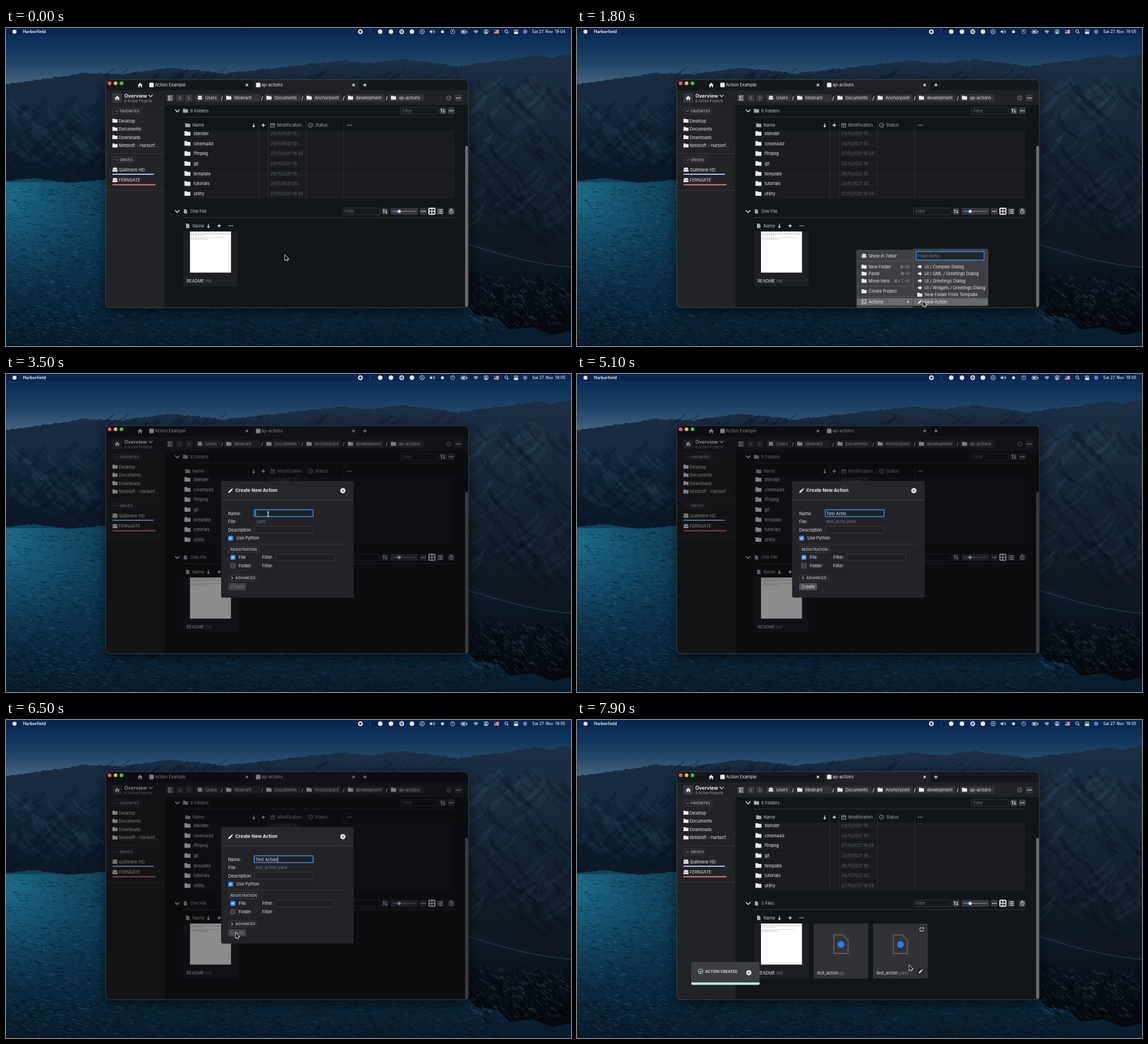
An HTML page with a canvas that plays this animation: 998 by 561 pixels, repeating every 8000 ms.

```html
<!DOCTYPE html>
<html lang="en">
<head>
<meta charset="utf-8">
<title>Create a new action</title>
<style>
html, body { margin: 0; width: 100%; height: 100%; overflow: hidden; background: #081b2b; }
canvas { display: block; }
</style>
</head>
<body>
<canvas width="998" height="561"></canvas>
<script>
const LOOP = 8000;
const WHITE = '#e9eaec', GREY = '#77797e', BLUE = '#3a93ea';
const screen = document.querySelector('canvas').getContext('2d');
let g = screen;

const paths = {
  folder: 'M-5-4h4l1.2 1.3h4.8v6.5h-10z',
  drive: 'M-3.2-3.8h6.4l1.2 3.5h-8.8zM-4.4.3h8.8v3.2h-8.8z',
  file: 'M-3.2-4.2h4l2.4 2.4v6h-6.4z',
  home: 'M-4.4.4L0-4 4.4.4H3.2V4H1V1.3H-1V4H-3.2V.4z',
  pencil: 'M-4 4l.6-2.4 5-5 1.8 1.8-5 5zM2.3-4l.8-.7 1.7 1.8-.7.7z',
  gem: 'M-4.5 0l3-2.6 1 1 1.3-2.2 3.7 3.8-3.7 3.8-1.3-2.2-1 1z',
  speaker: 'M-4-1.5h2l2.5-2.3v7.6l-2.5-2.3h-2z',
  arrow: 'M0 0v8.2l1.9-1.8 1.4 3.1 1.4-.6-1.4-3h2.6z',
  down: 'M-3.5-1.8L0 1.8 3.5-1.8',
  left: 'M1.8-3.2L-1.6 0 1.8 3.2',
  right: 'M-1.5-2.6L1.3 0-1.5 2.6',
  cross: 'M-2-2L2 2M2-2L-2 2',
  plus: 'M-3 0H3M0-3V3',
  sink: 'M0-3.2V3M-2 1L0 3.2 2 1',
  sort: 'M-2 3V-3M-3.8-1.3L-2-3.2-.2-1.3M2-3V3M.2 1.3L2 3.2 3.8 1.3',
  check: 'M-1.8 0L-.5 1.4 2-1.4',
  collapse: 'M-4.5-3.4H4M-1 0H4M-4.5 3.4H4M-1-2L-3.4 0-1 2',
  calendar: 'M-3.5-3H3.5V3.5H-3.5zM-3.5-1H3.5M-1 2L3-2',
  open: 'M-.5-3H-3.2V3.2H3V.5M0 0L3.4-3.4M.8-3.4H3.4V-.8',
  shell: 'M-3.8-3.8H3.8V3.8H-3.8zM-1.8-1.6L0 0-1.8 1.6M.4 1.8H2',
  beam: 'M-1.8-4Q0-4 0-2.5V2.5Q0 4-1.8 4M1.8-4Q0-4 0-2.5M0 2.5Q0 4 1.8 4'
};
for (const k in paths) paths[k] = new Path2D(paths[k]);

function icon(name, x, y, color = WHITE, lineWidth = 0, scale = 1) {
  g.save();
  g.translate(x, y);
  g.scale(scale, scale);
  g.fillStyle = g.strokeStyle = color;
  g.lineWidth = lineWidth;
  if (lineWidth) g.stroke(paths[name]); else g.fill(paths[name]);
  g.restore();
}
function box(x, y, w, h, fill, r = 0, stroke, lineWidth = 1) {
  g.beginPath();
  g.roundRect(x, y, w, h, r);
  if (fill) { g.fillStyle = fill; g.fill(); }
  if (stroke) { g.strokeStyle = stroke; g.lineWidth = lineWidth; g.stroke(); }
}
function disc(x, y, r, fill, stroke, lineWidth = 1) {
  g.beginPath();
  g.arc(x, y, r, 0, 7);
  if (fill) { g.fillStyle = fill; g.fill(); }
  if (stroke) { g.strokeStyle = stroke; g.lineWidth = lineWidth; g.stroke(); }
}
function text(s, x, y, color = WHITE, size = 7.4, weight = 430, align = 'left') {
  g.font = `${weight} ${size}px Inter, sans-serif`;
  g.textAlign = align;
  g.fillStyle = color;
  g.fillText(s, x, y + size * .36);
  return g.measureText(s).width;
}
function dots(x, y, color = WHITE) {
  for (const d of [-3, 0, 3]) disc(x + d, y, 1, color);
}
function button(x, y, w = 12) { box(x - w / 2, y - 6, w, 12, '#35373c', 2); }
function closer(x, y) { disc(x, y, 4.6, WHITE); icon('cross', x, y, '#222327', 1.2, .8); }
function linear(y0, y1, ...colors) {
  const f = g.createLinearGradient(0, y0, 0, y1);
  colors.forEach((c, i) => f.addColorStop(i / (colors.length - 1), c));
  return f;
}

function paintWallpaper() {
  let seed = 7;
  const rnd = () => (seed = (seed * 16807) % 2147483647) / 2147483647;
  // Jagged skyline through the given points, filled down to the bottom edge
  function ridge(pts, fill, rough) {
    g.beginPath();
    g.moveTo(pts[0], 561);
    for (let i = 0; i < pts.length - 2; i += 2) {
      const [x0, y0, x1, y1] = pts.slice(i, i + 4);
      for (let x = x0; x < x1; x += 4)
        g.lineTo(x, y0 + (y1 - y0) * (x - x0) / (x1 - x0) + (rnd() - .5) * rough);
    }
    g.lineTo(pts.at(-2), pts.at(-1));
    g.lineTo(pts.at(-2), 561);
    g.fillStyle = fill;
    g.fill();
  }
  function strokes(n, x, y, w, h, dx, dy, color, width = 1.5) {
    g.strokeStyle = color;
    for (let i = 0; i < n; i++) {
      const px = x + rnd() * w, py = y + rnd() * h, k = .3 + rnd();
      g.lineWidth = .4 + rnd() * width;
      g.beginPath();
      g.moveTo(px, py);
      g.quadraticCurveTo(px + dx * k * .3, py + dy * k * .7, px + dx * k, py + dy * k);
      g.stroke();
    }
  }
  box(0, 0, 998, 561, linear(0, 100, '#0a2a52', '#0f345c', '#24486a', '#456680'));
  ridge([0, 99, 50, 92, 100, 85, 140, 79, 205, 82, 285, 70, 390, 80, 480, 70, 590, 57, 640, 62,
    700, 55, 800, 67, 890, 56, 935, 48, 965, 53, 998, 45], linear(45, 300, '#1c2f44', '#11243a', '#0a1828'), 3);
  ridge([0, 128, 50, 112, 105, 118, 150, 106, 200, 135, 300, 155], linear(105, 280, '#182d45', '#0e2033', '#0a1725'), 4);
  ridge([780, 128, 830, 98, 880, 118, 940, 88, 998, 104], linear(90, 420, '#1b2e41', '#13212f', '#0c151f'), 4);
  strokes(45, -20, 118, 170, 100, 38, 34, 'rgba(70,105,140,.10)', 8);
  strokes(45, 20, 118, 170, 115, -36, 32, 'rgba(2,10,20,.20)', 9);
  strokes(60, 840, 85, 170, 250, -44, 38, 'rgba(85,115,145,.09)', 9);
  strokes(60, 815, 85, 170, 260, 38, 40, 'rgba(2,8,15,.20)', 10);
  strokes(70, 180, 70, 640, 22, -24, 16, 'rgba(4,12,24,.25)', 4);

  ridge([0, 270, 50, 265, 110, 273, 180, 267, 500, 300, 818, 430, 998, 515],
    linear(265, 561, '#12435b', '#0d3a55', '#0b2b43', '#071a29'), 2);
  const glow = g.createRadialGradient(5, 295, 10, 5, 295, 180);
  glow.addColorStop(0, 'rgba(34,128,162,.6)');
  glow.addColorStop(1, 'rgba(20,90,125,0)');
  box(0, 272, 240, 260, glow);
  strokes(700, 0, 276, 178, 280, 7, 1.5, 'rgba(85,155,190,.16)');
  strokes(700, 0, 276, 178, 280, 8, 1, 'rgba(0,14,28,.26)', 2.2);
  strokes(900, 0, 490, 880, 70, 8, 2, 'rgba(75,130,170,.14)');
  strokes(700, 0, 490, 880, 70, 9, 1, 'rgba(0,6,14,.28)', 2.2);

  g.fillStyle = linear(365, 540, '#101f2e', '#08101a', '#04080d');
  g.beginPath();
  [[810, 365], [860, 390], [998, 418], [998, 535], [965, 542], [930, 528], [890, 532], [868, 512], [830, 506], [810, 485]]
    .forEach(p => g.lineTo(...p));
  g.fill();
  strokes(220, 820, 435, 170, 85, 7, 6, 'rgba(105,130,150,.18)', 2.5);
  strokes(120, 820, 430, 170, 95, 8, 9, 'rgba(0,2,6,.35)', 5);
  g.strokeStyle = 'rgba(100,125,145,.45)';
  g.lineWidth = 1;
  g.beginPath();
  g.moveTo(815, 381);
  g.bezierCurveTo(865, 397, 930, 417, 998, 422);
  g.stroke();
}

function menuBar(t) {
  box(0, 0, 998, 12.5, 'rgba(8,36,82,.7)');
  disc(15, 6.5, 3.6, WHITE);
  text('Harborfield', 30, 6.5, WHITE, 7.2, 700);
  disc(626, 6.5, 3, WHITE, WHITE, 2.5);
  disc(626, 6.5, 2, '#10253d');
  for (const y of [3.5, 6.5, 9.5]) disc(643, y, .7, GREY);
  for (const x of [661, 680, 717]) disc(x, 6.5, 4, WHITE);
  disc(699, 6.5, 3.2, null, WHITE, 2);
  disc(699, 6.5, 1, WHITE);
  disc(735, 6.5, 3.8, null, WHITE);
  icon('right', 735.4, 6.5, WHITE, 0, .8);
  icon('speaker', 752, 6.5, WHITE, 0, .9);
  g.lineWidth = 1;
  g.strokeStyle = WHITE;
  for (const r of [2, 4]) { g.beginPath(); g.arc(753, 6.5, r, -.8, .8); g.stroke(); }
  disc(771, 6.5, 2.6, WHITE);
  disc(789, 6.5, 3.6, null, WHITE, .8);
  box(788.5, 4, 1, 3, WHITE);
  box(804, 4, 9, 5.5, null, 1.5, WHITE);
  box(805.5, 5.5, 5, 2.5, WHITE);
  box(814, 5.5, 1, 2.5, WHITE);
  for (const r of [1, 3.2, 5.4]) { g.beginPath(); g.arc(830, 10, r, -2.35, -.8); g.lineWidth = 1.3; g.strokeStyle = WHITE; g.stroke(); }
  disc(848, 6.5, 3.7, null, WHITE);
  disc(848, 5.7, 1.3, WHITE);
  box(846, 7.5, 4, 1.8, WHITE, 1);
  box(862, 3, 8.5, 7, '#e8dede');
  for (let i = 0; i < 4; i++) box(862, 3 + i * 2, 8.5, 1, '#c3444b');
  box(862, 3, 4, 4, '#3d5698');
  disc(883.5, 5.8, 2.5, null, WHITE);
  box(885.4, 7.7, 2, 2, WHITE, 1);
  box(897.5, 3.5, 7, 2.5, null, 1.2, WHITE);
  box(897, 7, 8, 3.5, WHITE, 1.7);
  disc(917, 6.5, 3.7, '#6d78b5');
  text(t < 400 ? 'Sat 27. Nov  19:04' : 'Sat 27. Nov  19:05', 988, 6.5, WHITE, 6.9, 500, 'right');
}

function sidebar() {
  box(176, 136, 104, 357.5, '#222327', [0, 0, 0, 8]);
  const heading = (s, y, w) => {
    box(188.5, y - 5, w, 10, null, 1, '#393b40');
    icon('down', 195.5, y, '#b9bbbf', 1, .75);
    text(s, 201, y, '#b9bbbf', 6.4, 500);
  };
  heading('FAVORITES', 146.5, 50);
  ['Desktop', 'Documents', 'Downloads', 'Nimbloft - Harborf...'].forEach((s, i) => {
    const y = 164 + i * 14.6;
    icon('folder', 192.5, y - .5, WHITE, 0, .9);
    text(s, 199, y);
  });
  box(176, 221, 104, 1, '#34363a');
  heading('DRIVES', 232.5, 39);
  [['Quillmere HD', 250, 73, '#a9c7f5'], ['FERNGATE', 268.5, 76, '#e8797b']].forEach(([s, y, w, c]) => {
    icon('drive', 192.5, y);
    text(s, 199, y);
    box(188, y + 7, w, 2, c);
  });
  box(176, 286, 104, 1, '#34363a');
}

function header() {
  box(176, 91, 641, 19, '#15181b', [8, 8, 0, 0]);
  box(436, 91, 188, 19, '#1f2125');
  box(176, 110, 641, 26, '#1f2125');
  icon('home', 237, 100.5);
  for (const [s, x, end] of [['Action Example', 253, 425.5], ['ap-actions', 441.5, 614]]) {
    box(x, 96.5, 8, 8, WHITE, 1.5);
    text(s, x + 10, 100.5);
    icon('cross', end, 100.5, WHITE, 1.3);
  }
  icon('plus', 634, 100.5, WHITE, 1.4);
  box(188, 115, 17, 17, '#35373c', 2);
  icon('home', 196.5, 123.5);
  text('Overview', 209, 120, WHITE, 8.6, 700);
  icon('down', 255.5, 119.5, WHITE, 1.2);
  text('8 Active Projects', 209, 129, '#a2a4a8', 6.2);
  button(290, 123.5, 13);
  icon('collapse', 290, 123.5, WHITE, 1.2);
  for (const [x, name] of [[307, 'left'], [323, 'right']]) {
    button(x, 123.5, 13);
    icon(name, x, 123.5, '#86888c', 1.1);
  }
  const crumbs = [['Users', 334, 45], ['tillobrant', 385, 65], ['Documents', 456, 65],
    ['Anchorpoint', 527, 66], ['development', 600, 69], ['ap-actions', 676, 62]];
  crumbs.forEach(([s, x, w], i) => {
    box(x, 117, w, 13, '#303237', 2);
    icon(i ? 'folder' : 'drive', x + 8.5, 123, WHITE, 0, .9);
    text(s, x + 18, 123.5);
    if (i) text('/', x - 3.5, 123.5, WHITE, 9, 600, 'center');
  });
  disc(782, 123.5, 3.8, null, '#9a9ca0', .9);
  icon('check', 782, 123.5, '#9a9ca0', .9);
  button(799, 123.5, 13);
  dots(799, 123.5);
}

function section(y, name, label, filterX) {
  icon('down', 302.5, y, WHITE, 1.4, 1.1);
  icon(name, 317, y, '#a6a8ac', 0, .9);
  text(label, 325.5, y, '#c2c4c7');
  box(313, y + 10.5, 479, 1, '#35373b');
  box(filterX + .5, y - 6, 66, 12, '#15181c', 1, '#33353a');
  text('Filter', filterX + 4, y, GREY);
  button(filterX + 75.5, y);
  icon('sort', filterX + 75.5, y, WHITE, 1);
}

function folderList() {
  section(146, 'folder', '8 Folders', 696);
  button(786.5, 146);
  dots(786.5, 146);
  icon('folder', 321, 171.5, '#a6a8ac', 0, .9);
  text('Name', 329.5, 171.5, '#c2c4c7');
  icon('sink', 437.5, 171.5, WHITE, 1.2);
  icon('plus', 454.5, 171.5, WHITE, 1.4);
  icon('calendar', 471, 171.5, '#a6a8ac', .9);
  text('Modification...', 479, 171.5, '#a6a8ac');
  disc(538, 171.5, 3.8, null, '#a6a8ac', .9);
  icon('check', 538, 171.5, '#a6a8ac', .9);
  text('Status', 546, 171.5, '#a6a8ac');
  dots(606.5, 171.5, '#a6a8ac');
  g.save();
  g.beginPath();
  g.rect(313, 181, 480, 121);
  g.clip();
  [['blender', '23/11/2021 15:...'], ['cinema4d', '24/11/2021 10:...'], ['ffmpeg', '27/11/2021 18:29'],
    ['git', '23/11/2021 19:...'], ['template', '26/11/2021 10:...'], ['tutorials', '24/11/2021 20:...'],
    ['utility', '27/11/2021 18:29']].forEach(([s, date], i) => {
    const y = 186.3 + i * 17.67;
    box(313, y - 8.3, 479, 16.6, '#1a1c20');
    icon('folder', 320.5, y - .2, WHITE, 0, 1.05);
    text(s, 331.5, y);
    text(date, 467, y, '#64666b');
  });
  g.restore();
  for (const x of [446, 463, 530, 596]) box(x, 164, 1, 136, '#2b2d31');
}

function fileSection(created) {
  section(323.5, 'file', created ? '3 Files' : 'One File', 594);
  box(679, 317.5, 49, 12, '#35373c', 2);
  box(683, 323, 41, 1, '#8a8c90');
  box(683, 322.7, 12, 1.5, BLUE);
  disc(694.5, 323.5, 2.8, WHITE);
  for (const x of [737, 767, 786.5]) button(x, 323.5);
  dots(737, 323.5);
  box(746, 317, 12.5, 12.5, WHITE, 2);
  for (const [x, y] of [[748, 319], [753, 319], [748, 324], [753, 324]]) box(x, y, 3.6, 3.6, '#222327');
  for (const y of [320, 323, 326]) { box(763, y, 1.3, 1.3, WHITE); box(765.3, y, 6, 1.3, WHITE); }
  disc(786.5, 324, 3.3, null, WHITE);
  box(786, 322, 1, 2.5, WHITE);
  box(785, 318.8, 3, 1.2, WHITE);
  icon('file', 321, 349, '#a6a8ac', 0, .95);
  text('Name', 329.5, 349, '#c2c4c7');
  icon('sink', 357.5, 349, WHITE, 1.2);
  icon('plus', 376.5, 349, WHITE, 1.4);
  dots(397, 349, '#b9bbbf');

  const card = (x, name, ext, fill) => {
    box(x, 359, 96.5, 97, fill, [0, 0, 2, 2]);
    const w = text(name, x + 6, 446);
    text(ext, x + 6 + w, 446, GREY);
  };
  card(313, 'README', '.md', '#1d1f23');
  box(325, 359, 72.4, 72.4, '#fff');
  const w = [40, 69, 66, 24, 0, 58, 26, 31];
  w.forEach((n, i) => { for (let x = 0; x < n; x += 4) box(326 + x, 360.2 + i * 1.8, 3.2, .6, '#aaa'); });
  if (!created) return;
  for (const [x, ext] of [[418, '.py'], [523, '.yaml']]) {
    card(x, 'test_action', ext, '#303237');
    icon('file', x + 48.3, 395.5, '#55575c', .55, 3.9);
    disc(x + 48.3, 396, 6, '#347bdc');
  }
  box(603.5, 364, 11, 11, '#222428', 2);
  icon('open', 609, 369.5, WHITE, 1);
  box(601.5, 438, 11.5, 11.5, '#222428', 2);
  icon('pencil', 607, 443.5, WHITE, 0, .9);
}

function contextMenu(t) {
  const bg = '#3d3f43', hot = '#68696d', rule = '#56585c', sub = t >= 1000;
  const row = t < 300 ? 0 : t < 500 ? 402 : t < 600 ? 421 : t < 700 ? 446 : t < 900 ? 464.5 : 483;
  box(494, 392, 99.5, 101, bg, 2, '#4a4c50');
  if (row) box(494.5, row - 6.5, 98.5, 13, hot);
  for (const y of [411, 455, 473]) box(495, y, 98, 1, rule);
  [['Show in Tidler', 402, 'drive'], ['New Folder', 421, 'folder', '⌘+N'], ['Paste', 433.3, 'folder', '⌘+V'],
    ['Move here', 446, 'folder', '⌘+⌥+V'], ['Create Project', 464.5, 'folder'], ['Actions', 483, 'shell']]
    .forEach(([s, y, name, keys]) => {
      icon(name, 507, y, WHITE, name === 'shell' ? 1 : 0, .9);
      text(s, 515, y);
      if (keys) text(keys, 587.5, y, '#a0a2a5', 7.2, 400, 'right');
    });
  icon('right', 585.5, 483, WHITE, 0, .95);
  if (!sub) return;
  box(594, 390, 132, 100, bg, 2, '#4a4c50');
  if (t >= 1300) box(594.5, 476.5, 131, 13, hot);
  box(599.5, 394.5, 119.5, 15, '#222428', 1, BLUE, 1.3);
  text('Filter items', 602, 402, GREY);
  [['UI / Complex Dialog', 421], ['UI / QML / Greetings Dialog', 433.4], ['UI / Greetings Dialog', 446],
    ['UI / Widgets / Greetings Dialog', 458.3], ['New Folder From Template', 470.7], ['New Action', 483.2]]
    .forEach(([s, y], i) => {
      icon(i < 4 ? 'gem' : i < 5 ? 'folder' : 'pencil', 605.5, y, WHITE, 0, .9);
      text(s, 614, y);
    });
}

const strikes = [3700, 3800, 3900, 4100, 4300, 4400, 4600, 4700, 4800, 5100, 5400];

function dialog(t) {
  const typed = 'Test Action'.slice(0, strikes.filter(s => s <= t).length);
  const focused = t >= 3300, ready = typed && t < 6400;
  box(380, 189, 234, 205.5, '#222328', 3);
  box(380, 189, 234, 33, '#25272b', [3, 3, 0, 0]);
  box(380, 222, 234, 1, '#393b40');
  icon('pencil', 396.5, 206);
  text('Create New Action', 405, 205.5, WHITE, 8.2, 650);
  closer(595, 205.8);
  const field = (x, y, on) => box(x + .5, y - 6, 104, 12, '#1f2024', 1, on ? BLUE : '#3b3d42', on ? 1.6 : 1);
  const tick = (x, y, on) => {
    box(x - 4, y - 4, 8.5, 8.5, on ? BLUE : '#3d3f44', 1.5, on ? null : '#595b60');
    if (on) icon('check', x, y, '#fff', 1.3);
  };
  text('Name:', 392.5, 246);
  field(438, 245.5, focused);
  const w = text(typed, 440.5, 246);
  if (focused && (t - 3500) % 1000 < 500) box(440.5 + w, 241, .8, 9.5, WHITE);
  text('File:', 392.5, 260.7);
  text(typed.trim().toLowerCase().replace(' ', '_') + '.yaml', 440.5, 260.7, GREY);
  text('Description:', 392.5, 275);
  field(438, 274.5);
  tick(396.5, 289.5, true);
  text('Use Python', 407, 289.7);
  box(392.5, 299.5, 210, 1, '#393b40');
  box(393.5, 304.5, 53, 10.5, null, 1, '#3b3d42');
  text('REGISTRATION', 396.5, 310, '#c8cacd', 6.4, 500);
  tick(400.5, 323.3, true);
  text('File', 411, 323.5);
  text('Filter:', 452.5, 323.5);
  field(476, 323.5);
  tick(400.5, 338, false);
  text('Folder', 411, 338);
  text('Filter:', 452.5, 338);
  box(393.5, 354.5, 51, 10.5, null, 1, '#3b3d42');
  icon('right', 399.5, 359.8, WHITE, 1);
  text('ADVANCED', 405, 359.8, '#c8cacd', 6.4, 500);
  box(392.5, 369, 31.5, 12.5, ready ? '#505257' : '#404247', 2);
  text('Create', 408.2, 375.3, ready ? WHITE : '#77797d', 7.4, 400, 'center');
  for (const d of [0, 2]) box(609 + d, 392 - d, 1, 1, '#66686c');
}

function toast() {
  box(202, 427, 120.5, 40, '#3b3d41', 2);
  box(202, 463, 120.5, 4.2, '#b3f1e4', [0, 0, 2, 2]);
  disc(218.3, 443.5, 4, null, '#b3f1e4', 1.1);
  icon('check', 218.3, 443.5, '#b3f1e4', 1.1);
  text('ACTION CREATED', 226.5, 443.3, WHITE, 6.5, 600);
  closer(303.5, 445.8);
}

// time, x, y of the pointer tip
const route = [[0, 493, 401], [200, 493, 401], [800, 535, 473], [1000, 538, 478], [1300, 598, 480], [1500, 598, 480],
  [1900, 614, 483], [2200, 614, 483], [3200, 463, 247], [5400, 463, 247], [6200, 406, 376], [6500, 406, 376],
  [7100, 490, 403], [7200, 490, 403], [7800, 587, 433], [LOOP, 587, 433]];

function pointer(t) {
  if (t >= 3700 && t < 5500) return;
  const i = route.findIndex(k => k[0] > t);
  const [t0, x0, y0] = route[i - 1], [t1, x1, y1] = route[i];
  const u = (t - t0) / (t1 - t0), e = u * u * (3 - 2 * u);
  const x = x0 + (x1 - x0) * e, y = y0 + (y1 - y0) * e;
  if (t >= 3100 && t < 5700) {
    icon('beam', x, y, '#fff', 1.2);
    return;
  }
  icon('arrow', x, y, '#fff', 1.5);
  icon('arrow', x, y, '#000');
}

function draw(t) {
  const modal = t >= 2100 && t < 6600;
  g.drawImage(wallpaper, 0, 0);
  menuBar(t);
  g.save();
  g.shadowColor = 'rgba(0,0,0,.65)';
  g.shadowBlur = 22;
  g.shadowOffsetY = 7;
  box(176, 91, 641, 402.5, '#121518', 8);
  g.restore();
  header();
  sidebar();
  folderList();
  fileSection(t >= 7300);
  box(811, 208, 5, 284, '#696b6e', 2);
  if (t >= 200 && t < 2200) {
    g.globalAlpha = modal ? .6 : 1;
    contextMenu(t);
    g.globalAlpha = 1;
  }
  if (t >= 2100 && t < 6700) box(176, 91, 641, 402.5, `rgba(0,2,4,${modal ? .45 : .2})`, 8);
  if (modal) dialog(t);
  if (t >= 6700) toast();
  ['#f25f58', '#f8bd37', '#3ec648'].forEach((c, i) => disc(183 + i * 10.5, 97.5, 3.2, c));
  box(176, 91, 641, 402.5, null, 8, 'rgba(120,128,138,.42)');
  pointer(t);
}

const wallpaper = document.createElement('canvas');
wallpaper.width = 998;
wallpaper.height = 561;
g = wallpaper.getContext('2d');
paintWallpaper();
g = screen;

function tick(now) {
  draw(Math.floor(now % LOOP / 100) * 100);
  requestAnimationFrame(tick);
}
requestAnimationFrame(tick);
</script>
</body>
</html>
```
